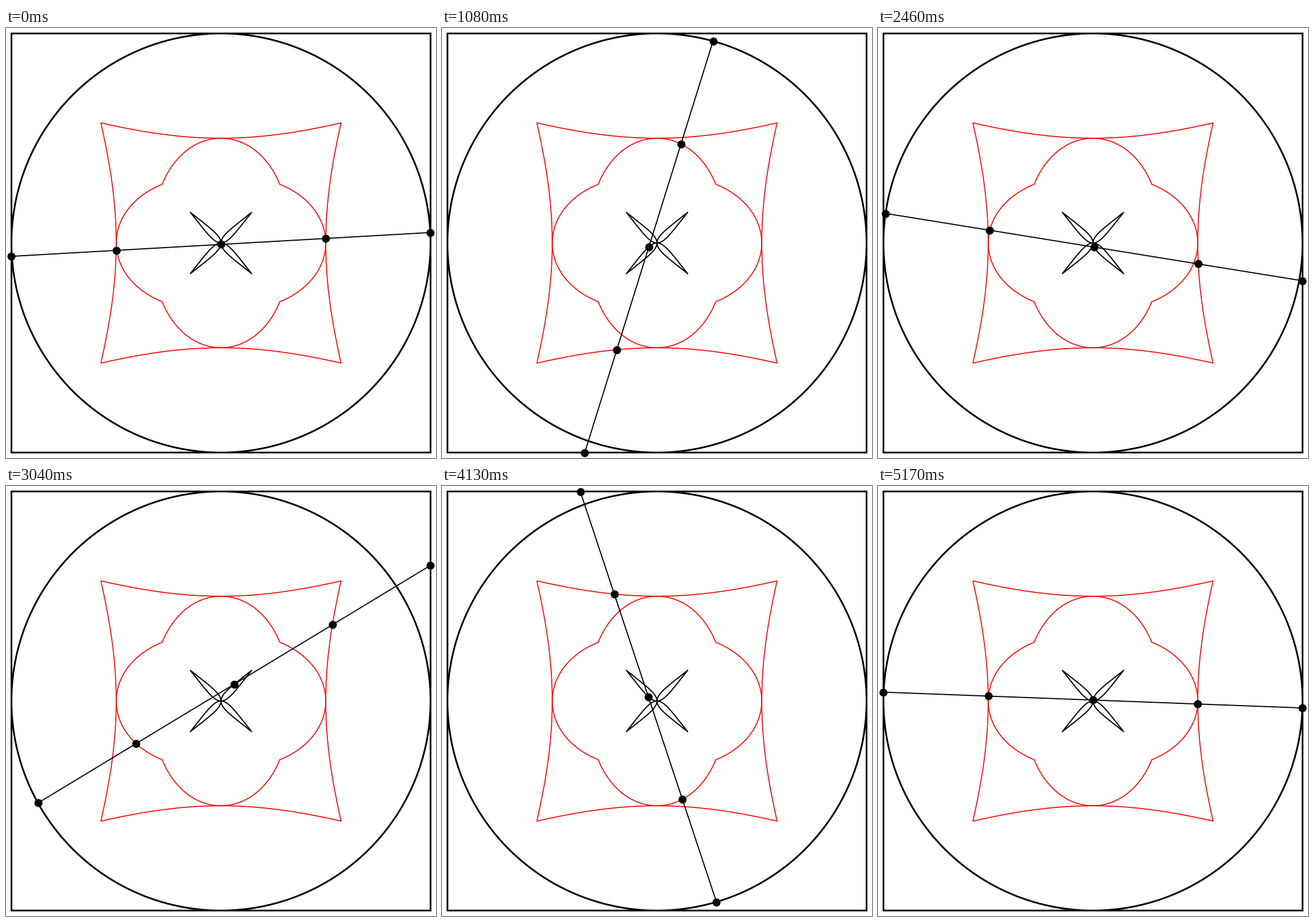
Animation of 748x748 px, one loop 5.21 s. Source, as a matplotlib script:

```python
import numpy as np
import matplotlib.pyplot as plt
from matplotlib.animation import FuncAnimation

SIZE, DPI = 748, 100
MID, R = SIZE / 2, 364.5
FRAMES, LOOP_MS = 125, 5210
STEP = 0.05  # radians per frame
PX = 72 / DPI


def circle(t):
    return np.array([np.cos(t), np.sin(t)])


def square(t):
    """Point moving at constant speed along the unit square's edge."""
    def coord(a):
        wrapped = (a + np.pi) % (2 * np.pi) - np.pi
        return np.clip(2 - 4 * np.abs(wrapped) / np.pi, -1, 1)
    return np.array([coord(t), coord(t - np.pi / 2)])


def between(t, s):
    """Point at share s of the rod from the circle to the opposite square point."""
    x, y = (1 - s) * circle(t) - s * square(t)
    return MID + R * x, MID - R * y


fig = plt.figure(figsize=(SIZE / DPI, SIZE / DPI), dpi=DPI, facecolor="white")
ax = fig.add_axes([0, 0, 1, 1])
ax.set_xlim(0, SIZE)
ax.set_ylim(SIZE, 0)
ax.axis("off")

turn = np.linspace(0, 2 * np.pi, 1601)


def trace(s, color, width, join="round"):
    ax.plot(*between(turn, s), color=color, lw=width * PX, snap=False,
            solid_joinstyle=join, solid_capstyle="projecting")


trace(1, "black", 3, "miter")
trace(0, "black", 3)
trace(0.25, "red", 1.7)
trace(0.75, "red", 1.7)
trace(0.5, "black", 2)

shares = np.linspace(0, 1, 5)
rod, = ax.plot([], [], color="black", lw=1.9 * PX, marker="o",
               ms=14 * PX, mew=0, snap=False, zorder=5)


def update(i):
    rod.set_data(*between(STEP * (i + 1), shares[:, None].T)) if False else \
        rod.set_data(*np.transpose([between(STEP * (i + 1), s) for s in shares]))
    return rod,


anim = FuncAnimation(fig, update, frames=FRAMES, interval=LOOP_MS / FRAMES,
                     repeat=True, repeat_delay=0, blit=False)
plt.show()
```
